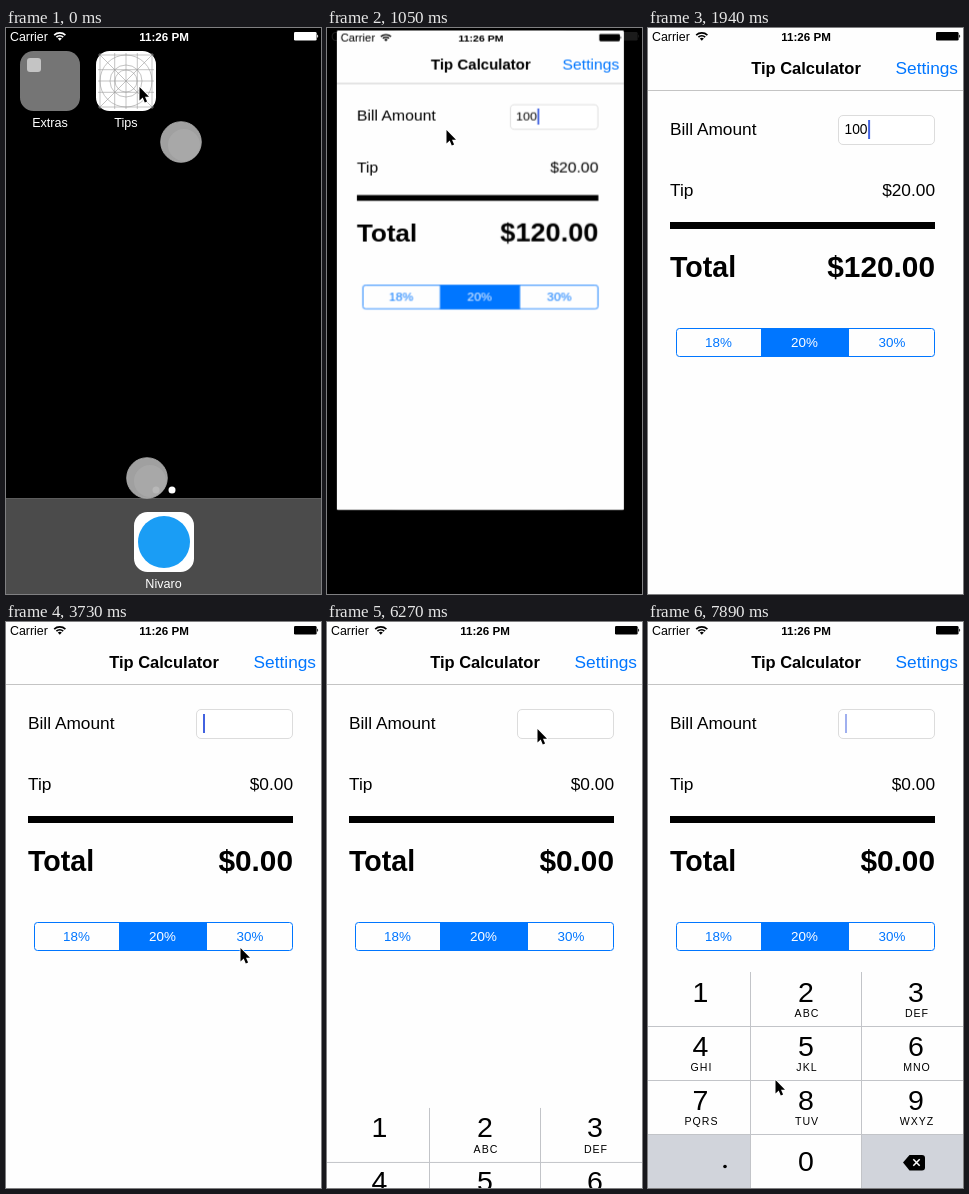
These frames come from a looping animation (315x566 px, 8000 ms). An HTML page:

```html
<!DOCTYPE html>
<html lang="en">
<head>
<meta charset="utf-8">
<title>Tip calculator</title>
<style>
  html, body { margin: 0; width: 100%; height: 100%; overflow: hidden; background: #000; }
  #stage { position: relative; width: 315px; height: 566px; overflow: hidden; background: #000; }
  #stage > *, #app svg { position: absolute; left: 0; top: 0; display: block; transform-origin: 0 0; }
  #app { width: 315px; height: 566px; overflow: hidden; background: #fefefe; }
  svg { overflow: visible; }
  text { font-family: "Liberation Sans", Arial, sans-serif; font-size: 17.3px; white-space: pre; }
  .mid { text-anchor: middle; }
  .end { text-anchor: end; }
  .bold { font-weight: bold; }
  .carrier { font-size: 12.4px; }
  .clock { font-size: 11.6px; }
  .title { font-size: 16.5px; }
  .label { font-size: 12.6px; fill: #fff; text-anchor: middle; }
  .bill { font-size: 13.8px; }
  .total { font-size: 29.8px; font-weight: bold; }
  .seg { font-size: 13.4px; fill: #0076ff; text-anchor: middle; }
  .seg.on { fill: #fff; }
  .digit { font-size: 28.5px; text-anchor: middle; }
  .letters { font-size: 10.6px; letter-spacing: 1px; text-anchor: middle; }
</style>
</head>
<body>
<div id="stage">
  <svg id="home" width="315" height="566">
    <rect x="14" y="23" width="60" height="60" rx="13.5" fill="#757575"/>
    <rect x="21" y="30" width="14" height="14" rx="3" fill="#c4c4c4"/>
    <text class="label" x="44" y="99">Extras</text>
    <text class="label" x="120" y="99">Tips</text>
    <circle cx="166" cy="462" r="3.5" fill="#fff"/>
    <path d="M0 470H315V566H0Z" fill="#4b4b4b"/>
    <path d="M0 470.5H315" stroke="#5c5c5c"/>
    <rect x="128" y="484" width="60" height="60" rx="13.5" fill="#fff"/>
    <circle cx="158" cy="514" r="26" fill="#1a9df5"/>
    <text class="label" x="157.5" y="560">Nivaro</text>
  </svg>

  <svg id="icon" width="60" height="60">
    <rect width="60" height="60" rx="13.5" fill="#fff"/>
    <g id="grid" fill="none" stroke="#9a9a9a" stroke-width=".6"></g>
  </svg>

  <svg id="homeStatus" width="315" height="20" color="#fff">
    <g id="status" fill="currentColor">
      <text class="carrier" x="4" y="12.7">Carrier</text>
      <path d="M48.2 7.1A8.2 8.2 0 0 1 59.4 7.1M50.4 9.2A5 5 0 0 1 57.2 9.2"
            fill="none" stroke="currentColor" stroke-width="1.7"/>
      <path d="M51.8 10.6A2.9 2.9 0 0 1 55.8 10.6L53.8 12.7Z"/>
      <text class="clock mid bold" x="158" y="12.5">11:26 PM</text>
      <rect x="288" y="4" width="22.6" height="8.6" rx="1.3"/>
      <path d="M311.2 6.6Q313.2 8.3 311.2 10Z"/>
    </g>
  </svg>

  <svg id="touches" width="315" height="566">
    <g id="touch">
      <circle cx="175" cy="114" r="20.3" fill="#a0a0a0" stroke="#b0b0b0" stroke-width=".8"/>
      <circle cx="178" cy="117" r="16" fill="#a8a8a8"/>
    </g>
    <use href="#touch" x="-34" y="336"/>
    <circle cx="150" cy="462" r="3.5" fill="#b8b8b8"/>
  </svg>

  <div id="app">
    <svg width="315" height="566">
      <use href="#status" color="#000"/>
      <text class="title mid bold" x="158" y="46">Tip Calculator</text>
      <text class="end" x="310" y="46" fill="#0076ff">Settings</text>
      <path d="M0 62.5H315" stroke="#c4c4c4"/>
      <text x="22" y="106.7">Bill Amount</text>
      <rect x="190.5" y="87.5" width="96" height="29" rx="4.5" fill="#fff" stroke="#dcdcdc"/>
      <text x="22" y="167.500">Tip</text>
      <path d="M22 194H287V201H22Z"/>
      <text class="total" x="22" y="249.300" style="font-size:28.600px">Total</text>
      <g id="amounts"></g>
      <rect id="caret" y="92" width="2" height="19" fill="#4262e0"/>
      <rect x="28.500" y="300.500" width="258" height="28" rx="3" fill="none" stroke="#0076ff"/>
      <path d="M113 300H201V329H113Z" fill="#0076ff"/>
      <text class="seg" x="70.500" y="319">18%</text>
      <text class="seg on" x="156.500" y="319">20%</text>
      <text class="seg" x="244" y="319">30%</text>
      <g id="keys">
        <path d="M0 350H315V566H0Z" fill="#fefefe"/>
        <path d="M0 512H102V566H0ZM214 512H315V566H214Z" fill="#d1d4db"/>
        <path d="M102.500 350V566M213.500 350V566M0 404.500H315M0 458.500H315M0 512.500H315" stroke="#c2c4c8"/>
        <circle cx="77" cy="544.500" r="1.800"/>
        <path d="M255 540.500L261.500 533H274a3 3 0 0 1 3 3v9.500a3 3 0 0 1-3 3H261.500Z"/>
        <path d="M265.300 537.300l6.400 6.400m0-6.400l-6.400 6.400" stroke="#fff" stroke-width="1.500"/>
      </g>
    </svg>
  </div>

  <svg id="cursor" width="12" height="19">
    <path d="M.5 1V14.500L3.700 11.600 5.800 16.500 8.100 15.500 6 10.800H10Z"
          stroke="#fff" stroke-width="1.600" paint-order="stroke"/>
  </svg>
</div>

<script>
const LOOP = 8000, TICK = 148.5;   // the screen refreshes once per tick
const TICKS = Math.ceil(LOOP / TICK);
const $ = id => document.getElementById(id);

// Samples pose(tick) for the whole loop and holds each sample for one tick.
function play(el, pose) {
  const frames = Array.from({ length: TICKS }, (_, tick) =>
    ({ offset: tick * TICK / LOOP, easing: "steps(1, end)", ...pose(tick) }));
  frames.push({ ...frames[TICKS - 1], offset: 1 });
  el.animate(frames, { duration: LOOP, iterations: Infinity });
}
const move = (x, y, sx = 1, sy = sx) =>
  `translate(${x}px, ${y}px) scale(${sx}, ${sy})`;
const mix = (a, b, p) => a + (b - a) * p;
function ease(u) {
  u = Math.min(1, Math.max(0, u));
  return u ** 3 * (6 * u * u - 15 * u + 10);
}

// Icon guide lines
$("grid").innerHTML =
  [4, 18.7, 30, 41.3, 56].map(p => `<path d="M${p} 2V58M2 ${p}H58"/>`).join("") +
  [26, 16, 11].map(r => `<circle cx="30" cy="30" r="${r}"/>`).join("") +
  `<path d="M4 4L56 56M56 4L4 56"/>`;

// Number pad
const columns = [52.5, 158, 268];
["", "ABC", "DEF", "GHI", "JKL", "MNO", "PQRS", "TUV", "WXYZ"].forEach((letters, i) => {
  const x = columns[i % 3], top = 350 + 54 * Math.floor(i / 3);
  $("keys").insertAdjacentHTML("beforeend",
    `<text class="digit" x="${x}" y="${top + 29.5}">${i + 1}</text>
     <text class="letters" x="${x + 1}" y="${top + 45}">${letters}</text>`);
});
$("keys").insertAdjacentHTML("beforeend", `<text class="digit" x="158" y="549">0</text>`);

// The bill loses one digit per deletion; tip and total follow.
const deletions = [22, 23, 25];
const digitsLeft = tick => 3 - deletions.filter(d => d <= tick).length;
for (let digits = 0; digits <= 3; digits++) {
  const bill = "100".slice(0, digits);
  const group = document.createElementNS("http://www.w3.org/2000/svg", "g");
  group.innerHTML =
    `<text class="bill" x="196.5" y="106">${bill}</text>
     <text class="end" x="287" y="167.5">$${(bill * 0.2).toFixed(2)}</text>
     <text class="end total" x="287" y="249.3">$${(bill * 1.2).toFixed(2)}</text>`;
  $("amounts").append(group);
  play(group, tick => ({ opacity: +(digitsLeft(tick) === digits) }));
}

// Launch: the icon grows into the app, its height lagging a little.
function launch(tick) {
  const u = (tick - 4.41) / 3.48, p = ease(u);
  return {
    p, x: mix(90, 0, p), y: mix(23, 0, p),
    w: mix(60, 315, p), h: mix(60, 566, ease(u - 0.05))
  };
}
play($("app"), tick => {
  const { p, x, y, w, h } = launch(tick);
  return {
    transform: move(x, y, w / 315, h / 566),
    opacity: Math.min(1, 2.1 * p),
    borderRadius: 15 * (1 - p) + "px"
  };
});
play($("icon"), tick => {
  const { p, x, y, w, h } = launch(tick);
  return { transform: move(x, y, w / 60, h / 60), opacity: 1 - p };
});
play($("home"), tick => {
  const { x, y, w } = launch(tick), zoom = w / 60;
  return { transform: move(x - 90 * zoom, y - 23 * zoom, zoom) };
});
play($("homeStatus"), tick => ({ opacity: 1 - launch(tick).p }));
play($("touches"), tick => ({ opacity: +(tick < 5) }));

// Caret blinking restarts on launch, on every deletion and on focus.
const FOCUS = 43, blink = [1, 1, 1, 0.5, 0, 0, 0.5];
const restarts = [6, ...deletions, FOCUS];
play($("caret"), tick => {
  const since = Math.max(0, ...restarts.filter(r => r <= tick));
  const blurred = tick > 35 && tick < FOCUS;
  return {
    transform: move(197 + 7.7 * digitsLeft(tick), 0),
    opacity: blurred ? 0 : blink[(tick - since) % blink.length]
  };
});

play($("keys"), tick => ({ transform: move(0, mix(216, 0, ease((tick - 40) / 4.65))) }));

// Pointer stops: tick, x, y
const stops = [
  [0, 133, 58], [6, 133, 58], [7, 119, 101], [10, 340, 600],
  [15, 330, 357], [17, 234, 325], [27, 234, 325], [34, 210, 106],
  [44, 210, 106], [47, 221, 150], [51, 107, 450], [53, 127, 457]
];
play($("cursor"), tick => {
  const next = Math.max(1, stops.findIndex(([at]) => at >= tick));
  const [t0, x0, y0] = stops[next - 1], [t1, x1, y1] = stops[next];
  const p = ease((tick - t0) / (t1 - t0));
  return { transform: move(mix(x0, x1, p), mix(y0, y1, p)) };
});
</script>
</body>
</html>
```
